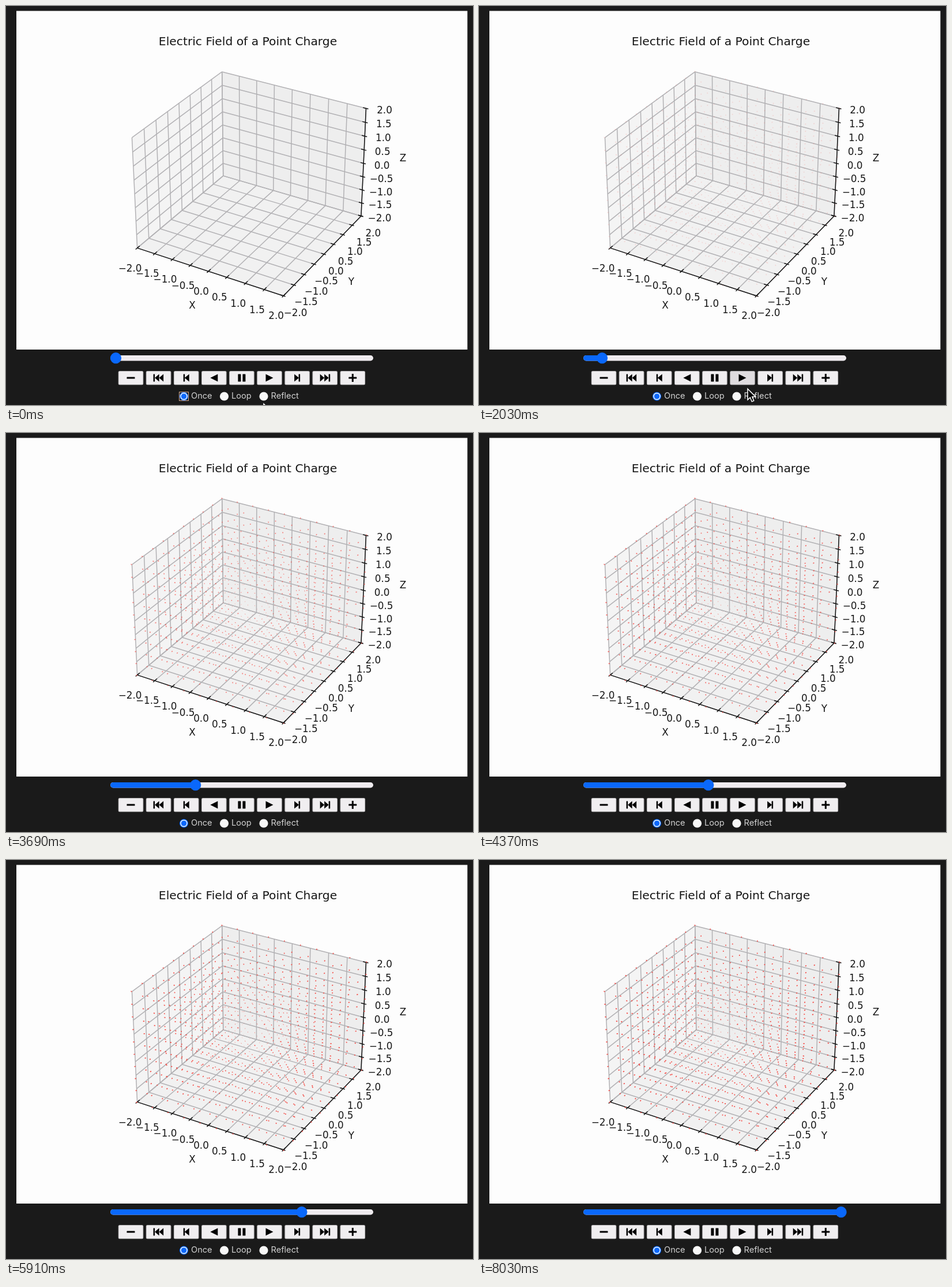
Write an HTML page with a canvas that moves like this. It is 810 px wide and 691 px high and loops after 8050 ms.

```html
<!DOCTYPE html>
<html lang="en">
<head>
<meta charset="utf-8">
<title>Electric Field of a Point Charge</title>
<style>
html, body { margin: 0; width: 100%; height: 100%; overflow: hidden; background: #1a1a1a; }
canvas { display: block; }
</style>
</head>
<body>
<canvas id="stage" width="810" height="691"></canvas>
<script>
const ctx = document.getElementById('stage').getContext('2d');
const LOOP = 8050, CLICK = 1740, STEP = 280, LAST = 19;
const TICKS = Array.from({ length: 9 }, (_, i) => -2 + i / 2);

// Perspective view at elevation 30 degrees, azimuth -60 degrees.
function project(x, y, z) {
  const a = x * 0.29765, b = y * 0.29765, c = z * 0.2232;
  const k = 2440 / (10 - (0.433 * a - 0.75 * b + 0.5 * c));
  return [425.4 + k * (0.866 * a + 0.5 * b),
          298.6 - k * (-0.25 * a + 0.433 * b + 0.866 * c)];
}

function trace(points, close) {
  ctx.beginPath();
  points.forEach(p => ctx.lineTo(p[0], p[1]));
  if (close) ctx.closePath();
}

function fillShape(points, color) {
  trace(points, true);
  ctx.fillStyle = color;
  ctx.fill();
}

function line3(p, q, color, width = 1.5) {
  trace([project(...p), project(...q)]);
  ctx.strokeStyle = color;
  ctx.lineWidth = width;
  ctx.stroke();
}

function disc(x, y, r, color) {
  ctx.beginPath();
  ctx.arc(x, y, r, 0, 7);
  ctx.fillStyle = color;
  ctx.fill();
}

function bar(x, y, w, h, r, color) {
  ctx.beginPath();
  ctx.roundRect(x, y, w, h, r);
  ctx.fillStyle = color;
  ctx.fill();
}

function label(text, x, y, font, color = '#161616', align = 'center') {
  ctx.font = font;
  ctx.fillStyle = color;
  ctx.textAlign = align;
  ctx.textBaseline = 'alphabetic';
  ctx.fillText(text, x, y);
}

const PLOT_FONT = '16.8px "DejaVu Sans", sans-serif';

function drawAxes() {
  bar(18, 8.5, 782.3, 586.5, 0, '#fdfdfd');
  label('Electric Field of a Point Charge', 419.5, 68, '20.3px "DejaVu Sans", sans-serif');

  const pane = (color, ...corners) => fillShape(corners.map(c => project(...c)), color);
  pane('#f4f4f4', [-2, -2, -2], [-2, 2, -2], [-2, 2, 2], [-2, -2, 2]);
  pane('#eeeeee', [-2, 2, -2], [2, 2, -2], [2, 2, 2], [-2, 2, 2]);
  pane('#f1f1f1', [-2, -2, -2], [2, -2, -2], [2, 2, -2], [-2, 2, -2]);

  const grid = '#b2b1b4', ink = '#161616';
  for (const t of TICKS) {
    line3([t, -2, -2], [t, 2, -2], grid);
    line3([t, 2, -2], [t, 2, 2], grid);
    line3([-2, t, -2], [2, t, -2], grid);
    line3([-2, t, -2], [-2, t, 2], grid);
    line3([-2, -2, t], [-2, 2, t], grid);
    line3([-2, 2, t], [2, 2, t], grid);
  }

  line3([-2, -2, -2], [2, -2, -2], ink);
  line3([2, -2, -2], [2, 2, -2], ink);
  line3([2, 2, -2], [2, 2, 2], ink);

  const tickLabel = (t, p, dx, dy) => {
    const [x, y] = project(...p);
    label(t.toFixed(1).replace('-', '\u2212'), x + dx, y + dy + 6, PLOT_FONT);
  };
  for (const t of TICKS) {
    line3([t, -2.07, -2], [t, -1.9, -2], ink);
    line3([2.05, t, -2], [1.92, t, -2], ink);
    line3([2.06, 2, t], [1.92, 2, t], ink);
    tickLabel(t, [t, -2, -2], -12.6, 34.5);
    tickLabel(t, [2, t, -2], 20.8, 29);
    tickLabel(t, [2, 2, t], 32, 3);
  }
  label('X', 323, 524, PLOT_FONT);
  label('Y', 599, 483, PLOT_FONT);
  label('Z', 688.5, 269, PLOT_FONT);
}

// Unit field directions on a 10 x 10 x 10 lattice, drawn as tiny dashes.
const field = new Path2D();
for (let n = 0; n < 1000; n++) {
  const p = [n % 10, Math.floor(n / 10) % 10, Math.floor(n / 100)].map(i => -2 + i * 4 / 9);
  const k = 1 + 0.032 / Math.hypot(...p);
  field.moveTo(...project(...p));
  field.lineTo(...project(...p.map(v => v * k)));
}

// Each step paints another translucent layer of arrows.
function drawField(step) {
  ctx.save();
  ctx.globalAlpha = 1 - 0.85 ** step;
  ctx.strokeStyle = '#f5423c';
  ctx.lineWidth = 1.7;
  ctx.stroke(field);
  ctx.restore();
}

function drawSlider(step) {
  const x = 190.5 + 23.03 * step;
  bar(181, 605, 456, 9.5, 4.75, '#efebef');
  bar(181, 605, x - 181, 9.5, 4.75, '#0a68fb');
  disc(x, 609.7, 9.6, '#0a68fb');
}

const block = (x, w, h = 13) => bar(x, 644 - h / 2, w, h, 0.5, '#000');
const arrow = (x, w) => fillShape([[x, 637.5], [x + w, 644], [x, 650.5]], '#000');
const ICONS = [
  x => block(x - 7, 14, 3),
  x => { block(x - 9, 2.5); arrow(x + 1, -7.5); arrow(x + 8.5, -7.5); },
  x => { block(x - 5, 2.5); arrow(x + 5, -8); },
  x => arrow(x + 6.5, -13),
  x => { block(x - 6.5, 5); block(x + 1.5, 5); },
  x => arrow(x - 6.5, 13),
  x => { arrow(x - 5, 8); block(x + 2.5, 2.5); },
  x => { arrow(x - 8.5, 7.5); arrow(x - 1, 7.5); block(x + 6.5, 2.5); },
  x => { block(x - 7, 14, 3); block(x - 1.5, 3, 14); }
];

function drawControls(t, [mx, my]) {
  ICONS.forEach((icon, i) => {
    const x = 216.5 + 48.1 * i;
    const hover = Math.abs(mx - x) < 22 && my > 632 && my < 664 || i === 5 && t > CLICK && t < 2130;
    bar(x - 21.8, 632, 43.6, 24.2, 2.5, '#b4b2b4');
    bar(x - 20.8, 633, 41.6, 22.2, 1.5, hover ? '#dfdcdf' : '#f0eef0');
    icon(x);
  });

  [[308.5, 'Once'], [378.5, 'Loop'], [447, 'Reflect']].forEach(([x, text], i) => {
    disc(x, 676, 7.6, i ? '#f8f8f8' : '#0a68fb');
    if (!i) {
      disc(x, 676, 6.2, '#fff');
      disc(x, 676, 4.8, '#0a68fb');
    }
    label(text, x + 12.5, 680, '14.6px Inter, sans-serif', '#d2d2d2', 'left');
  });
  if (t < CLICK) {
    ctx.strokeStyle = '#d3a88c';
    ctx.lineWidth = 1;
    ctx.strokeRect(300.5, 668.5, 16, 15);
  }
}

const MOUSE = [[0, 446, 688], [450, 400, 655], [870, 378, 643], [1290, 448, 648],
               [1740, 450, 648], [2030, 465, 662], [2130, 470, 672], [2180, 480, 700]];

function mouseAt(t) {
  const i = MOUSE.findIndex(p => p[0] > t);
  if (i < 0) return [480, 720];
  const [t0, x0, y0] = MOUSE[i - 1], [t1, x1, y1] = MOUSE[i];
  const u = (t - t0) / (t1 - t0), e = u * u * (3 - 2 * u);
  return [x0 + (x1 - x0) * e, y0 + (y1 - y0) * e];
}

function drawMouse([x, y]) {
  const shape = [[0, 0], [0, 19], [4.3, 15], [7.3, 22], [10.7, 20.6], [7.8, 13.8], [13.6, 13.6]];
  trace(shape.map(p => [x + 1 + p[0], y + 1 + p[1]]), true);
  ctx.fillStyle = '#000';
  ctx.fill();
  ctx.strokeStyle = '#fff';
  ctx.lineWidth = 1.5;
  ctx.stroke();
}

function draw() {
  const t = performance.now() % LOOP;
  const step = Math.max(0, Math.min(LAST, Math.floor((t - CLICK) / STEP)));
  const mouse = mouseAt(t);
  bar(0, 0, 810, 691, 0, '#1a1a1a');
  drawAxes();
  drawField(step);
  drawSlider(step);
  drawControls(t, mouse);
  drawMouse(mouse);
  requestAnimationFrame(draw);
}
draw();
</script>
</body>
</html>
```
